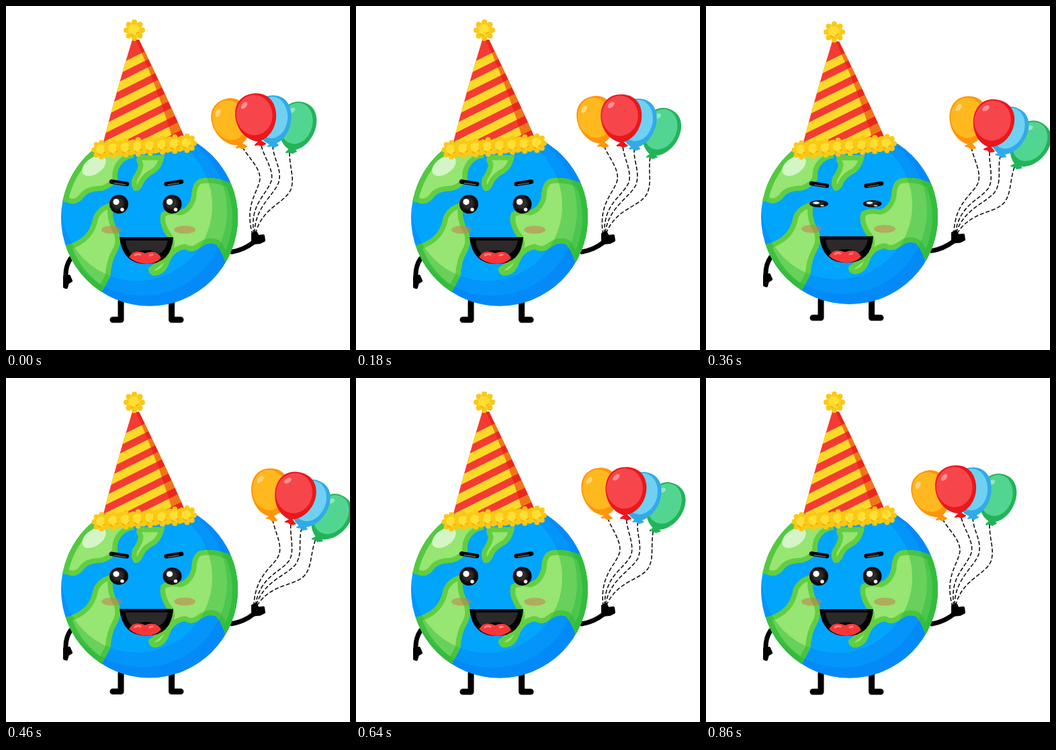
Write an HTML page that moves like this. It is 512x512 px and loops after 0.88 s.

```html
<!DOCTYPE html>
<html lang="en">
<head>
<meta charset="utf-8">
<title>Party planet</title>
<style>
  html, body { margin: 0; width: 100%; height: 100%; overflow: hidden; background: #fff; }
  svg { display: block; width: 100vw; height: 100vh; }
</style>
</head>
<body>
<svg viewBox="0 0 512 512" stroke-linecap="round" stroke-linejoin="round">
  <defs>
    <clipPath id="globe"><circle cx="213.5" cy="315" r="131.5"/></clipPath>
    <path id="landShape" d="
      M130 180 L70 230 V290 Q84 289 96 294 Q108 296 117 283 Q124 275 143 275 Q158 271 166 258 Q164 244 173 234 Q181 226 190 226 V180Z
      M196 222 Q192 230 197 236 Q196 245 189 254 Q184 266 191 275 Q199 277 204 265 Q208 255 222 248 Q233 240 236 222Z
      M158 293 Q138 296 130 314 Q127 334 113 345 Q104 352 88 357 L80 400 L140 430 Q151 410 155 403 Q157 379 165 366 Q173 352 168 337 Q155 316 160 293Z
      M290 257 Q312 253 334 264 L360 300 L340 390 L327 383 Q322 366 313 355 Q301 350 290 359 Q277 369 266 362 Q249 365 243 382 Q238 398 224 401 Q212 402 212 390 Q228 379 236 370 Q250 354 238 341 Q226 322 231 308 Q243 300 259 304 Q272 300 276 283 Q277 260 290 257Z"/>
    <clipPath id="land"><use href="#landShape"/></clipPath>
    <clipPath id="cone"><path d="M188 50 H198 Q238 132 265 194 Q205 206 145 202 Q164 128 188 50Z"/></clipPath>
    <radialGradient id="iris" cx=".45" cy=".45"><stop offset=".45" stop-color="#302c2b"/><stop offset=".85" stop-color="#0a0808"/></radialGradient>
    <g id="eye">
      <circle r="14" fill="url(#iris)"/>
      <circle cx="-4" cy="-3.5" r="4.6" fill="#fff"/>
      <circle cx="5" cy="8" r="2.8" fill="#eee"/>
    </g>
  </defs>

  <g id="balloons"></g>

  <g id="body">
    <g fill="none" stroke="#000">
      <path stroke-width="9" d="M171 440 V467 H159 M246.500 440 V467 H260"/>
      <path stroke-width="7" d="M96 376 Q88 388 89 404 M336 366 Q354 363 368 352"/>
    </g>
    <path stroke="#000" stroke-width="4" d="M87 403 L94 402 L97 409 L92 412 L90 419 L87 418Z M367 339 L372 337 L375 343 L383 342 L384 349 L378 352 L367 353Z"/>

    <g clip-path="url(#globe)" fill="none">
      <circle cx="213.5" cy="315" r="132" fill="#02a5fc"/>
      <g stroke="#0878f4" stroke-opacity=".36" stroke-width="60">
        <circle cx="195" cy="297" r="142"/>
        <circle cx="203" cy="305" r="156"/>
      </g>
      <g clip-path="url(#land)">
        <use href="#landShape" fill="#97e572" stroke="#62ce40" stroke-width="15"/>
        <circle cx="213.5" cy="315" r="130" stroke="#55c840" stroke-width="13"/>
        <g stroke="#25b53c" stroke-opacity=".42" stroke-width="60">
          <circle cx="195" cy="297" r="142"/>
          <circle cx="203" cy="305" r="156"/>
        </g>
      </g>
      <ellipse cx="131" cy="238" rx="20" ry="12" transform="rotate(-35 131 238)" fill="#d4f5c5"/>
    </g>

    <g fill="#c47d4c" fill-opacity=".55">
      <ellipse cx="157" cy="333" rx="15" ry="6"/>
      <ellipse cx="266" cy="333" rx="16" ry="6"/>
    </g>
    <path d="M169 344 H249 Q246 384 209 384 Q173 384 169 344Z"/>
    <path fill="#2b2929" d="M178 349 H241 Q238 364 228 369 Q210 358 187 369 Q179 361 178 349Z"/>
    <path fill="#f8363a" d="M183 374 Q190 361 207 368 Q224 361 231 375 Q222 384 209 384 Q193 383 183 374Z"/>
    <path fill="none" stroke="#ff8078" stroke-width="3" d="M192 371 Q196 368 200 370 M214 371 L218 370"/>

    <g id="brows" fill="none">
      <path stroke="#000" stroke-width="6.5" d="M157 261.500 L180 265 M238.500 265 L261 261.500"/>
      <path stroke="#6b6b68" stroke-width="1.300" d="M161 263.500 L178 266 M241 266 L257 263.500"/>
    </g>
    <use href="#eye" class="eye" data-x="168"/>
    <use href="#eye" class="eye" data-x="247.5"/>

    <g clip-path="url(#cone)">
      <path fill="#f43b32" d="M140 40 H270 V210 H140Z"/>
      <g id="stripes" stroke="#fcd928" stroke-width="12.500"></g>
      <path fill="#e41408" fill-opacity=".5" d="M192 48 Q225 118 250 205 H275 L200 48Z"/>
    </g>
    <g id="fluff"></g>
  </g>
</svg>
<script>
const LOOP = 880, SWING = 852, STEP = 20;
const $ = id => document.getElementById(id);

// Shaded oval with a knot and a string down to the hand
function balloon({ x, y, rx, ry, tilt, light, dark, knot: [kx, ky], string }) {
  return `<path d="${string}" fill="none" stroke="#111" stroke-width="1.6" stroke-dasharray="6 3" stroke-linecap="butt"/>
    <path d="M${kx} ${ky - 5} l-7 7 l5 -1 l4 2 l6 -3Z" fill="${dark}" stroke="${dark}" stroke-width="2"/>
    <g transform="translate(${x} ${y}) rotate(${tilt})">
      <path d="M0 ${-ry} C${rx * 1.4} ${-ry} ${rx * 1.22} ${ry * .8} 0 ${ry} C${-rx * 1.22} ${ry * .8} ${-rx * 1.4} ${-ry} 0 ${-ry}Z" fill="${dark}"/>
      <ellipse cx="-2" cy="-4" rx="${rx - 4}" ry="${ry - 6}" fill="${light}"/>
      <ellipse cx="${-rx * .5}" cy="${-ry * .55}" rx="6" ry="3.5" transform="rotate(-45 ${-rx * .5} ${-ry * .55})" fill="#fff" opacity=".4"/>
    </g>`;
}

$("balloons").innerHTML = [
  { x: 433, y: 179, rx: 28, ry: 37, tilt: 15, light: "#53d592", dark: "#22b458", knot: [424, 216],
    string: "M422 218 C422 242 430 256 424 273 C415 294 381 299 371 340" },
  { x: 397, y: 170, rx: 28, ry: 37, tilt: 3, light: "#70d0f2", dark: "#32aae8", knot: [397, 207],
    string: "M397 208 C398 228 411 242 406 262 C399 282 369 300 370 340" },
  { x: 336, y: 173, rx: 29, ry: 36, tilt: -20, light: "#ffb81e", dark: "#ff950b", knot: [350, 209],
    string: "M352 210 C361 226 378 240 378 257 C376 277 354 295 367 340" },
  { x: 372, y: 166, rx: 31, ry: 36, tilt: -6, light: "#f7464b", dark: "#ea171b", knot: [378, 205],
    string: "M380 208 C384 225 399 244 395 260 C387 283 362 295 369 340" },
].map(balloon).join("");

$("stripes").innerHTML = Array.from({ length: 6 }, (_, i) => {
  const c = 178 + 26 * i;
  return `<path d="M130 ${c - 65} L280 ${c - 140}"/>`;
}).join("");

// Round dash caps give each puff its scalloped rim
const puff = (x, y, r) =>
  `<circle cx="${x}" cy="${y}" r="${r}" fill="#ffd326" stroke="#fac915" stroke-width="8" pathLength="8" stroke-dasharray="0 1"/>
   <circle cx="${x - 1}" cy="${y - 1}" r="${r * .65}" fill="#ffdf35"/>
   <path d="M${x - 5} ${y + 6} l3 2 M${x + 3} ${y + 5} l3 -2" stroke="#efae10" stroke-width="2"/>`;
$("fluff").innerHTML = puff(191, 36, 12) +
  Array.from({ length: 8 }, (_, i) => puff(142 + i * 18.2, 214 - i * 1.4, 10.5)).join("");

function draw(now) {
  const step = Math.floor(now % LOOP / STEP) * STEP;
  const t = step < 40 ? 0 : Math.min(step, SWING);
  const angle = 9.6 * (1 - Math.cos(2 * Math.PI * t / SWING));
  const near = Math.min(1, Math.abs(t - 360) / 130);
  const blink = (1 + Math.cos(Math.PI * near)) / 2;

  $("balloons").setAttribute("transform", `rotate(${angle} 372 345)`);
  $("body").setAttribute("transform", `translate(0 ${240 * .013 * blink}) scale(1 ${1 - .013 * blink})`);
  $("brows").setAttribute("transform", `translate(0 ${3 * blink})`);
  for (const eye of document.querySelectorAll(".eye"))
    eye.setAttribute("transform", `translate(${eye.dataset.x} 295) scale(1 ${1 - .62 * blink})`);
  requestAnimationFrame(draw);
}
draw(performance.now());
</script>
</body>
</html>
```
